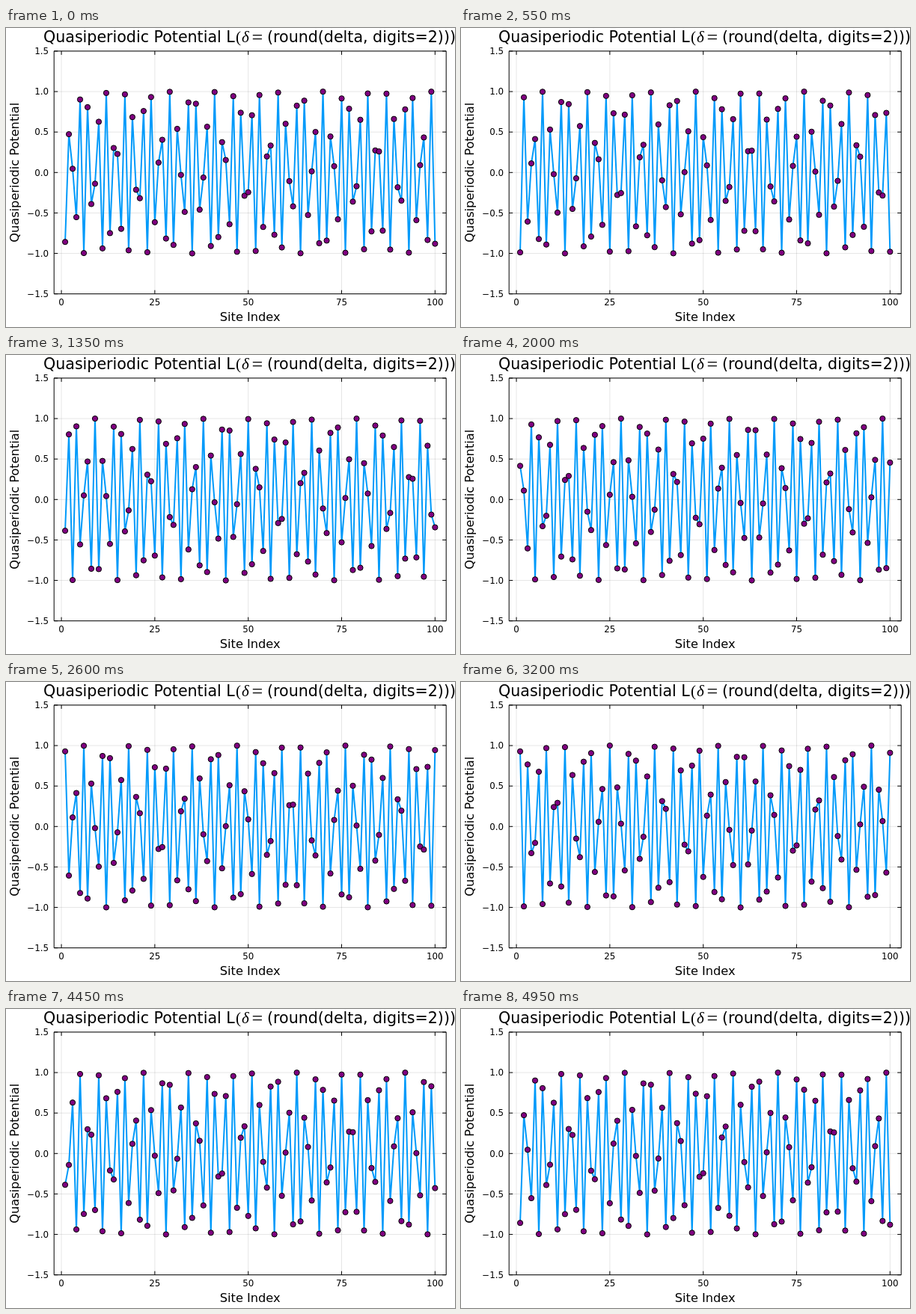
Write an HTML page that moves like this. It is 600x400 px and loops after 5000 ms.

```html
<!DOCTYPE html>
<html lang="en">
<head>
<meta charset="utf-8">
<title>Quasiperiodic Potential</title>
<style>
  html, body { margin: 0; width: 100%; height: 100%; overflow: hidden; background: #fff; }
  svg { display: block; width: 600px; height: 400px; }
  text { font-family: "DejaVu Sans", sans-serif; fill: #000; }
  .title { font-size: 20.6px; }
  .math { font-family: "Liberation Serif", serif; font-size: 21px; }
  .label { font-size: 16.2px; text-anchor: middle; }
  .tick { font-size: 11.8px; }
  .grid { stroke: #000; stroke-opacity: .1; }
  .axis { stroke: #000; fill: none; }
  .curve { stroke: #009afa; stroke-width: 2; stroke-linejoin: round; fill: none; }
  .dot { fill: #800080; stroke: #000; }
</style>
</head>
<body>
<svg id="plot" viewBox="0 0 600 400">
  <text class="title" x="50" y="19">Quasiperiodic Potential L</text>
  <text class="math" x="307" y="19">(</text>
  <text class="math" x="315" y="19" font-style="italic">δ</text>
  <text class="math" x="328.5" y="20.7" style="font-size:26px">=</text>
  <text class="title" x="349" y="19">(round(delta, digits=2)))</text>
  <text class="label" x="326.2" y="392">Site Index</text>
  <text class="label" transform="translate(17 193.3) rotate(-90)">Quasiperiodic Potential</text>
</svg>
<script>
const plot = document.getElementById('plot');
const SITES = 100, STEPS = 100, STEP_MS = 50, TICK = 5;
const BOX = { left: 64.2, right: 588.2, top: 30.9, bottom: 355.7 };
const px = site => 74.04 + site * 4.993;
const py = value => 193.3 - value * 108.25;

function add(tag, attrs, text) {
  const el = document.createElementNS('http://www.w3.org/2000/svg', tag);
  for (const key in attrs) el.setAttribute(key, attrs[key]);
  if (text) el.textContent = text;
  return plot.appendChild(el);
}

const path = (cls, d) => add('path', { class: cls, d });

for (let site = 0; site <= 100; site += 25) {
  const x = px(site);
  path('grid', `M${x} ${BOX.top}V${BOX.bottom}`);
  path('axis', `M${x} ${BOX.top}v${TICK}M${x} ${BOX.bottom}v${-TICK}`);
  add('text', { class: 'tick', x, y: 371.4, 'text-anchor': 'middle' }, String(site));
}
for (let value = -1.5; value <= 1.5; value += 0.5) {
  const y = py(value);
  path('grid', `M${BOX.left} ${y}H${BOX.right}`);
  path('axis', `M${BOX.left} ${y}h${TICK}M${BOX.right} ${y}h${-TICK}`);
  add('text', { class: 'tick', x: 57, y: y + 4.3, 'text-anchor': 'end' },
    value.toFixed(1).replace('-', '\u2212'));
}
path('axis', `M${BOX.left} ${BOX.top}H${BOX.right}V${BOX.bottom}H${BOX.left}Z`);

const curve = path('curve', '');
const dots = Array.from({ length: SITES }, (_, i) =>
  add('circle', { class: 'dot', cx: px(i + 1), r: 3.6 }));

// Cosine with an irrational frequency; the phase makes one turn per loop.
function draw(step) {
  const delta = 2 * Math.PI * step / (STEPS - 1);
  const points = dots.map((dot, i) => {
    const y = py(Math.cos(2 * Math.PI * Math.SQRT2 * (i + 1) + delta)).toFixed(2);
    dot.setAttribute('cy', y);
    return `${px(i + 1).toFixed(2)} ${y}`;
  });
  curve.setAttribute('d', 'M' + points.join('L'));
}

const start = performance.now();
let shown = -1;
function tick() {
  const elapsed = Math.max(0, performance.now() - start);
  const step = Math.floor(elapsed / STEP_MS) % STEPS;
  if (step !== shown) draw(shown = step);
  requestAnimationFrame(tick);
}
tick();
</script>
</body>
</html>
```
